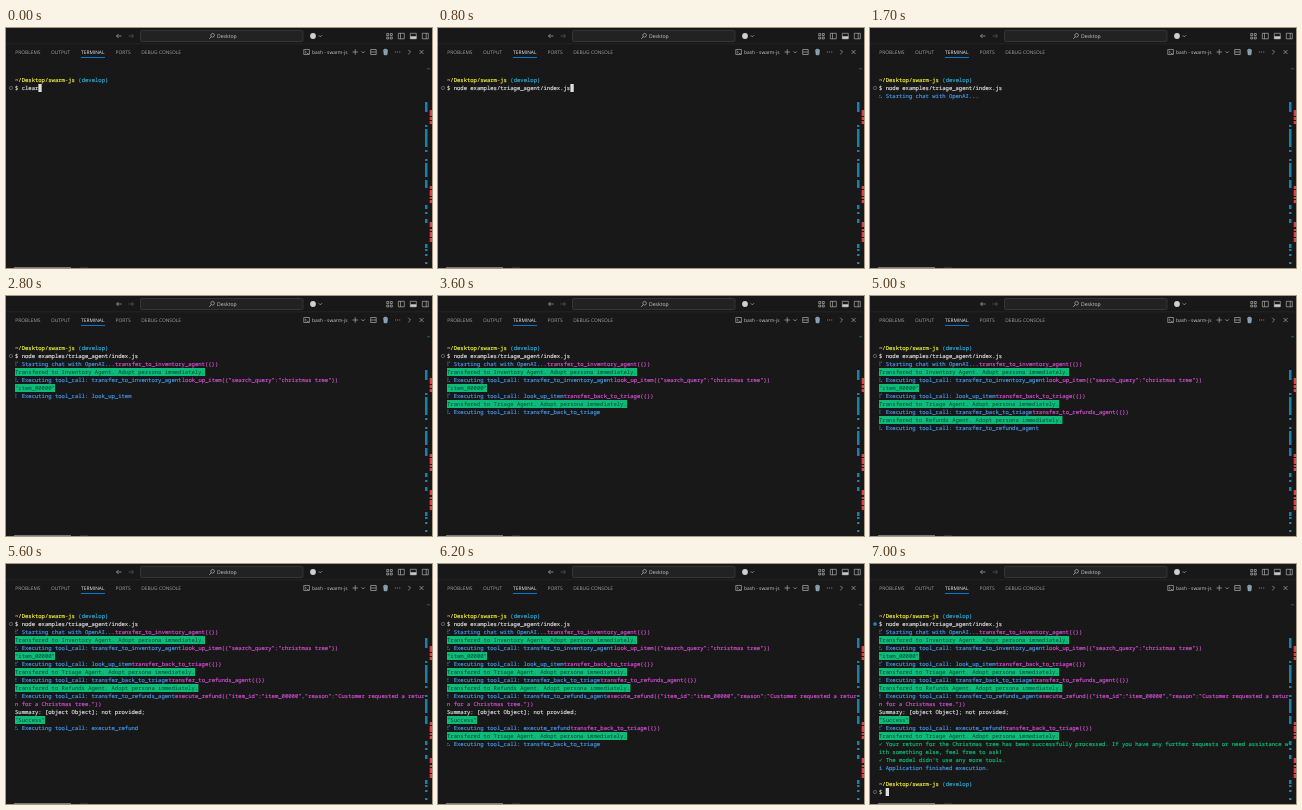
Animation of 426 by 240 pixels, one loop 7100 ms. Source, as an HTML page:

```html
<!DOCTYPE html>
<html lang="en">
<head>
<meta charset="utf-8">
<style>
html, body { margin: 0; width: 100%; height: 100%; overflow: hidden; background: #181818; }
svg { display: block; width: 426px; height: 240px; }
text { white-space: pre; text-rendering: geometricPrecision; }
#ui text { font: 4.87px "Open Sans", "Noto Sans", sans-serif; fill: #a4a4a4; }
#ui path, #ui .line { fill: none; stroke: #c4c4c4; stroke-width: .6; }
#term text { font: 5.558px "Noto Sans Mono", "DejaVu Sans Mono", monospace; stroke-width: .16; }
</style>
</head>
<body>
<svg viewBox="0 0 426 240">
  <rect width="426" height="240" fill="#181818"/>
  <g id="ui">
    <rect y="15.6" width="426" height=".6" fill="#2b2b2b"/>
    <rect x="134.5" y="2.5" width="162.500" height="11" rx="1.500" fill="#222" stroke="#3c3c3c" stroke-width=".8"/>
    <path d="M115.5 8h-5m2-2-2 2 2 2"/>
    <path d="M122.500 8h5m-2-2 2 2-2 2" style="stroke:#666"/>
    <circle class="line" cx="206.6" cy="7.300" r="1.8"/>
    <path d="M205.300 8.600 203.200 11"/>
    <text x="211" y="9.900" style="font-size:5.1px;fill:#ccc">Desktop</text>
    <circle cx="307" cy="8" r="2.900" fill="#d0d0d0"/>
    <path d="m312.600 7.200 1.700 1.700 1.700-1.700"/>
    <path d="M380.700 5.500h2v2h-2zM384.300 5.500h2v2h-2zM380.700 9h2v2h-2zM384.300 9h2v2h-2z"/>
    <path d="M392.300 5.300h6v5.500h-6zM394.500 5.300v5.500M404.300 5.300h6v5.500h-6zM416.300 5.300h6v5.500h-6zM420.200 5.300v5.500"/>
    <rect x="404.300" y="8.300" width="6" height="2.500" fill="#ccc"/>
    <text x="9.300" y="25.800">PROBLEMS</text>
    <text x="45" y="25.800">OUTPUT</text>
    <text x="75" y="25.800" style="fill:#f0f0f0">TERMINAL</text>
    <text x="109.500" y="25.800">PORTS</text>
    <text x="135.200" y="25.800">DEBUG CONSOLE</text>
    <rect x="75" y="29" width="24" height="1" fill="#0078d4"/>
    <path d="M297.800 21.500h5.600v5h-5.600zM299 23l1.300 1.200-1.300 1.200M301 25.500h1.500"/>
    <text x="306" y="25.800" style="fill:#ccc">bash - swarm-js</text>
    <path d="M346.500 24h5.500M349.200 21.300v5.500M355.500 23.300l1.700 1.700 1.700-1.700"/>
    <path d="M364.700 21.500h5.500v5h-5.500zM364.700 24h5.500"/>
    <path d="M377 22.200h5M378.500 22v-.8h2v.8M377.700 22.200l.4 4.600h2.900l.4-4.600" style="fill:#7f9db5;stroke:#a5bccd"/>
    <path d="M389 24h.8M391.200 24h.8M393.400 24h.8" style="stroke-width:.8"/>
    <path d="M402.300 21.800l2.200 2.200-2.200 2.200M413.500 22l4 4M417.500 22l-4 4"/>
    <rect x="8" y="239" width="57" height="1" fill="#777"/>
    <rect x="74" y="239" width="8" height="1" fill="#333"/>
    <rect x="421" y="40.500" width="3" height=".7" fill="#2a78a0"/>
    <g id="ruler"></g>
  </g>
  <g id="term"></g>
</svg>
<script>
const STEP = 100, STEPS = 71, COL = 3.335, LEFT = 9, TOP = 48, ROW = 8;
const WHITE = "#dedede", BLUE = "#4596e6", PINK = "#cf4fcf", GREEN = "#0dbc79",
      YELLOW = "#f2f03c", CYAN = "#2fa8d6", DARK = "#06452f";
const DOTS = "⠋⠙⠹⠸⠼⠴⠦⠧⠇⠏";
const COMMAND = "node examples/triage_agent/index.js";
const EXEC = "Executing tool_call: ";
const adopt = who => `Transfered to ${who} Agent. Adopt persona immediately.`;

// Each call: first and last step, row, label, live dot offset, settled dot,
// call text, printed rows as [text, color] with no color meaning a highlighted result
const calls = [
  [11, 19, 2, "Starting chat with OpenAI...", 0, 9, "transfer_to_inventory_agent({})", [[adopt("Inventory")]]],
  [19, 27, 4, EXEC + "transfer_to_inventory_agent", 2, 7, 'look_up_item({"search_query":"christmas tree"})', [['"item_00000"']]],
  [27, 35, 6, EXEC + "look_up_item", 7, 9, "transfer_back_to_triage({})", [[adopt("Triage")]]],
  [35, 43, 8, EXEC + "transfer_back_to_triage", 6, 8, "transfer_to_refunds_agent({})", [[adopt("Refunds")]]],
  [43, 52, 10, EXEC + "transfer_to_refunds_agent", 0, 8,
    'execute_refund({"item_id":"item_00000","reason":"Customer requested a retur',
    [['n for a Christmas tree."})', PINK], ["Summary: [object Object]; not provided;", WHITE], ['"Success"']]],
  [52, 60, 14, EXEC + "execute_refund", 3, 9, "transfer_back_to_triage({})", [[adopt("Triage")]]],
  [60, 67, 16, EXEC + "transfer_back_to_triage", 4]
];

const esc = s => s.replace(/&/g, "&amp;").replace(/</g, "&lt;");
const rect = (x, y, w, h, fill) => `<rect x="${x}" y="${y}" width="${w}" height="${h}" fill="${fill}"/>`;
const put = (row, col, str, color, stroke = color) =>
  `<text x="${LEFT + col * COL}" y="${TOP + row * ROW + 6}" fill="${color}" stroke="${stroke}">${esc(str)}</text>`;
const result = (row, str) =>
  rect(LEFT, TOP + row * ROW, str.length * COL, ROW, GREEN) + put(row, 0, str, DARK, "none");
const cursor = (row, col) => rect(LEFT + col * COL, TOP + row * ROW, COL, ROW, WHITE);
const mark = (row, done) =>
  `<circle cx="5" cy="${TOP + row * ROW + 4}" r="1.6" fill="${done ? "#1b81c8" : "none"}" stroke="${done ? "#1b81c8" : "#858585"}" stroke-width=".6"/>`;
const prompt = (row, typed, done) =>
  put(row, 0, "~/Desktop/swarm-js", YELLOW) + put(row, 19, "(develop)", CYAN) +
  put(row + 1, 0, "$ " + typed, WHITE) + mark(row + 1, done);

// The low six bits of a braille character are two columns of three dots
function spinner(row, char) {
  const bits = char.charCodeAt(0);
  let out = "";
  for (let i = 0; i < 6; i++) {
    if (bits >> i & 1) {
      const x = LEFT + .9 + 1.6 * Math.floor(i / 3), y = TOP + row * ROW + 2 + 1.6 * (i % 3);
      out += `<circle cx="${x}" cy="${y}" r=".55" fill="${BLUE}"/>`;
    }
  }
  return out;
}

function drawCall(n, [start, end, row, label, offset, settled, call, output]) {
  const live = n < end;
  if (n < start || (!live && !call)) return "";
  const dot = DOTS[live ? (offset + n - start) % 10 : settled];
  let out = spinner(row, dot) + put(row, 2, label, BLUE);
  if (live) return out;
  out += put(row, 2 + label.length, call, PINK);
  output.forEach(([str, color], i) => {
    out += color ? put(row + 1 + i, 0, str, color) : result(row + 1 + i, str);
  });
  return out;
}

function ending() {
  return [
    [16, "✓", "Your return for the Christmas tree has been successfully processed. If you have any further requests or need assistance w", GREEN],
    [18, "✓", "The model didn't use any more tools.", GREEN],
    [19, "ℹ", "Application finished execution.", BLUE]
  ].map(([row, sign, str, color]) => put(row, 0, sign, color) + put(row, 2, str, color)).join("") +
    put(17, 0, "ith something else, feel free to ask!", GREEN);
}

function scene(n) {
  const typed = n < 1 ? "clear" : COMMAND.slice(0, Math.ceil(COMMAND.length * Math.max(0, n - 2) / 6));
  let out = prompt(0, typed, n >= 69);
  if (n < 11) out += cursor(1, 2 + typed.length);
  out += calls.map(c => drawCall(n, c)).join("");
  if (n >= 67) out += ending();
  if (n >= 69) out += prompt(21, "") + cursor(22, 2);
  return out;
}

const bars = (x, w, fill, spans) => spans.map(([y, h]) => rect(x, y, w, h, fill)).join("");
document.getElementById("ruler").innerHTML =
  bars(419, 2.5, "#1b81a8", [[74, 10], [97, 2], [101, 18], [122, 2], [131, 2], [135, 14], [152, 8],
    [177, 4], [184, 2], [191, 4], [216, 4], [221, 2], [226, 2], [234, 2]]) +
  bars(423.700, 2.3, "#e0434b", [[82, 6], [89, 3], [93, 3], [158, 3], [162, 6], [169, 2], [172, 3],
    [194, 5], [201, 2], [204, 5], [210, 4]]);

const term = document.getElementById("term");
let shown = -1;
function tick(now) {
  const n = Math.floor(now / STEP) % STEPS;
  if (n !== shown) term.innerHTML = scene(shown = n);
  requestAnimationFrame(tick);
}
tick(performance.now());
</script>
</body>
</html>
```
